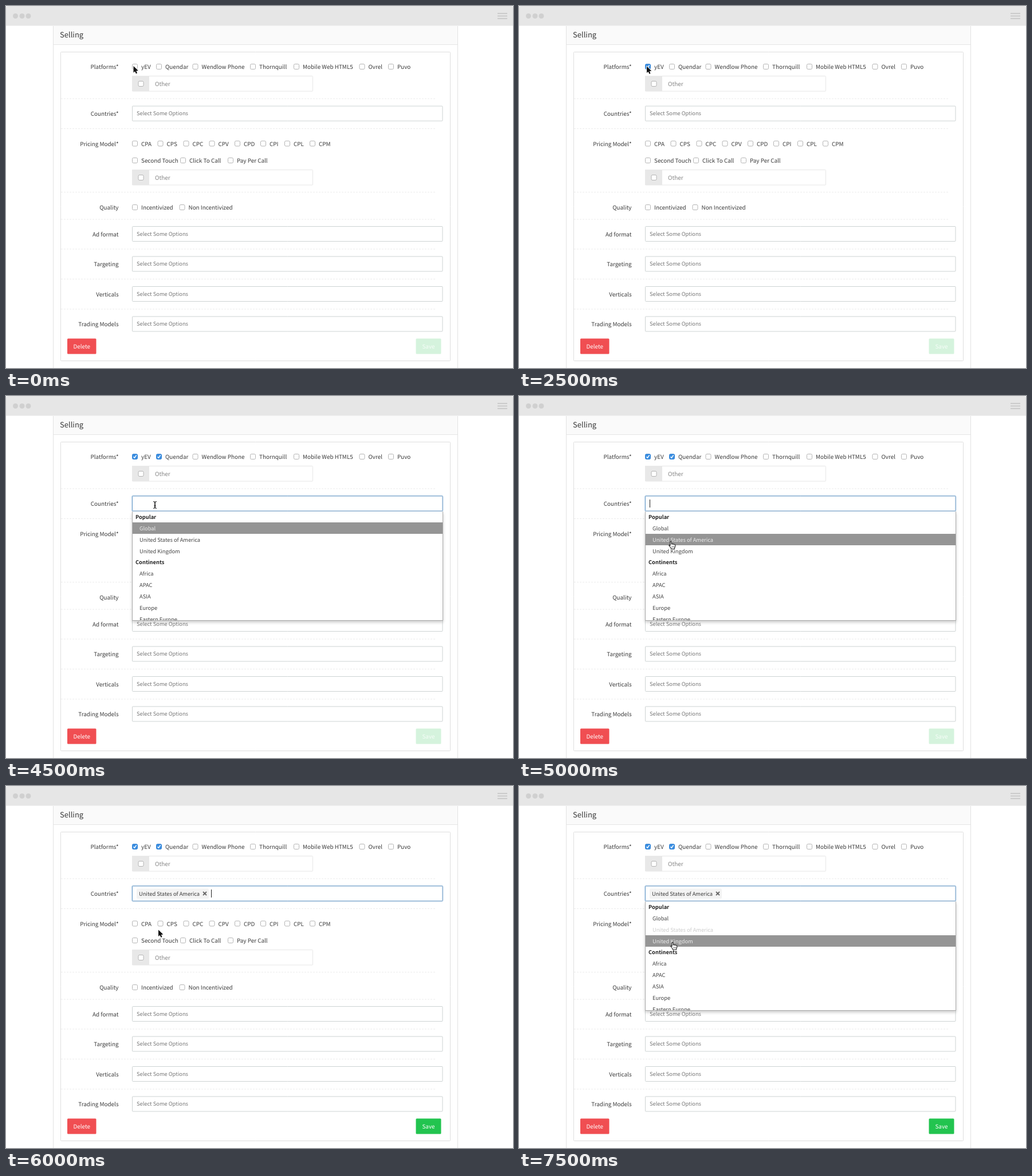
These frames come from a looping animation (885 by 633 pixels, 8000 ms). An HTML page with a canvas:

```html
<!DOCTYPE html>
<html lang="en">
<head>
<meta charset="utf-8">
<title>Selling form</title>
<style>
html, body { margin: 0; width: 100%; height: 100%; overflow: hidden; background: #fff; }
canvas { display: block; }
</style>
</head>
<body>
<canvas id="stage" width="885" height="633"></canvas>
<script>
const ctx = document.getElementById('stage').getContext('2d');
const LOOP = 8000, STEP = 500;
const FAMILY = '"Noto Sans CJK JP", "Noto Sans CJK SC", "Noto Sans CJK", "Open Sans", sans-serif';
const LABEL = 9.9, SMALL = 9.3;
const INK = '#3a3a3a', HINT = '#777';

const platforms = [[225, 'yEV'], [267, 'Quendar'], [330.5, 'Wendlow Phone'], [431, 'Thornquill'],
  [507, 'Mobile Web HTML5'], [621.5, 'Ovrel'], [672, 'Puvo']];
const pricing = [[225, 'CPA'], [269.5, 'CPS'], [314.5, 'CPC'], [359.5, 'CPV'],
  [404, 'CPD'], [449, 'CPI'], [491, 'CPL'], [535, 'CPM']];
const pricingMore = [[225, 'Second Touch'], [309, 'Click To Call'], [392, 'Pay Per Call']];
const quality = [[225, 'Incentivized'], [307.5, 'Non Incentivized']];
const labels = [['Platforms*', 106], ['Countries*', 188], ['Pricing Model*', 240.5], ['Quality', 352],
  ['Ad format', 399], ['Targeting', 451], ['Verticals', 503.5], ['Trading Models', 556]];
const options = ['Popular', 'Global', 'United States of America', 'United Kingdom', 'Continents',
  'Africa', 'APAC', 'ASIA', 'Europe', 'Eastern Europe'];

// Pointer: start time, shape, x, y
const pointer = [
  [0, arrow, 222.5, 105], [1000, arrow, 223, 105.5], [3000, arrow, 268.5, 105.5],
  [4000, beam, 260, 190.5], [5000, hand, 267, 260.5], [6000, arrow, 266, 251.5],
  [6500, beam, 410, 189], [7500, hand, 270, 279.5]
];

function text(str, x, mid, size, color, align = 'left', weight = 400) {
  ctx.font = `${weight} ${size}px ${FAMILY}`;
  ctx.textRendering = 'geometricPrecision';
  ctx.textAlign = align;
  ctx.fillStyle = color;
  ctx.fillText(str, x, mid + size * 0.37);
}

function rect(x, y, w, h, fill) {
  ctx.fillStyle = fill;
  ctx.fillRect(x, y, w, h);
}

function box(x, y, w, h, r, fill, stroke) {
  ctx.beginPath();
  ctx.roundRect(x, y, w, h, r);
  if (fill) { ctx.fillStyle = fill; ctx.fill(); }
  if (stroke) { ctx.strokeStyle = stroke; ctx.lineWidth = 1; ctx.stroke(); }
}

function path(points, color, width, close) {
  ctx.beginPath();
  points.forEach(([x, y]) => ctx.lineTo(x, y));
  if (close) ctx.closePath();
  ctx.strokeStyle = color;
  ctx.lineWidth = width;
  ctx.stroke();
}

function checkbox(x, y, on) {
  box(x - 4.5, y - 4.5, 9, 9, 2, on ? '#3b8fe2' : '#fff', on ? '#3583d3' : '#b4b4b4');
  if (on) path([[x - 2.4, y + 0.2], [x - 0.7, y + 2.3], [x + 2.6, y - 2.6]], '#fff', 1.5);
}

function checks(list, y, checked = []) {
  list.forEach(([x, name], i) => {
    checkbox(x, y, checked[i]);
    text(name, x + 11, y + 0.5, LABEL, INK);
  });
}

function other(y) {
  box(220.5, y - 13.5, 315, 26.5, 1, '#fff', '#e6e6e6');
  rect(220, y - 14, 30, 27, '#e8e8e8');
  checkbox(235.5, y, false);
  text('Other', 260, y, 10, '#858585');
}

function field(y, hint) {
  box(220.5, y - 13, 541.5, 26, 1, '#fff', '#cdd3d3');
  if (hint) text('Select Some Options', 228, y - 0.3, SMALL, HINT);
}

function button(x, w, name, fill, color) {
  box(x, 581.5, w, 27, 1.5, fill);
  text(name, x + w / 2, 595.3, LABEL, color, 'center');
}

function chrome() {
  rect(0, 0, 885, 633, '#fff');
  box(0, 0, 885, 34.5, [4, 4, 0, 0], '#e6e6e6');
  for (const x of [16.5, 28, 39]) {
    ctx.beginPath();
    ctx.arc(x, 17.5, 4.5, 0, 7);
    ctx.fillStyle = '#d0d0d0';
    ctx.fill();
  }
  for (const y of [12, 16.5, 21]) rect(858, y, 17, 2, '#cbcbcb');
  rect(83, 35, 705, 32, '#fafafa');
  rect(82, 67, 707, 1, '#e6e6e6');
  rect(82, 35, 1, 598, '#e2e2e2');
  rect(788, 35, 1, 598, '#e2e2e2');
  text('Selling', 94, 50.5, 13, INK);
  box(95.5, 80.5, 680, 540, 1, null, '#dedede');
  ctx.setLineDash([3, 2]);
  for (const y of [162, 214.5, 325.5, 373, 425, 477.5, 530]) {
    path([[96, y], [751, y]], '#ececec', 1);
  }
  ctx.setLineDash([]);
}

function form(t) {
  labels.forEach(([name, y]) => text(name, 196.5, y + 0.5, LABEL, INK, 'right'));
  checks(platforms, 106, [t >= 1500, t >= 3500]);
  other(136);
  checks(pricing, 240.5);
  checks(pricingMore, 270);
  other(300);
  checks(quality, 352);
  field(188, t < 4500);
  for (const y of [398.5, 451, 503.5, 556]) field(y, true);
  button(107, 50.5, 'Delete', '#f04e52', '#fff');
  const ready = t >= 6000;
  button(715.5, 44, 'Save', ready ? '#22c44f' : '#d5f3dd', ready ? '#fff' : '#f6fdf8');
}

function countries(t) {
  if (t < 4500) return;
  const tagged = t >= 6000;
  box(219.5, 174, 543.5, 28, 2, null, 'rgba(90,150,205,.3)');
  box(220.5, 175, 541.5, 26, 1, '#fff', '#6a9cc9');
  if (tagged) {
    box(228, 179.5, 126, 17.5, 2, '#f3f3f3');
    text('United States of America', 232, 188.2, SMALL, INK);
    path([[344, 185], [350, 191]], '#686868', 1.8);
    path([[350, 185], [344, 191]], '#686868', 1.8);
  }
  if (Math.floor(t / STEP) % 2 === 0) rect(tagged ? 358 : 228, 181, 1, 14, '#222');
  if (t < 6000 || t >= 7000) {
    const active = t < 5000 ? 1 : t < 6000 ? 2 : t < 7500 ? 1 : 3;
    menu(active, tagged);
  }
}

function menu(active, tagged) {
  ctx.save();
  ctx.shadowColor = 'rgba(0,0,0,.2)';
  ctx.shadowBlur = 5;
  ctx.shadowOffsetY = 3;
  rect(220, 202, 543, 191, '#aaa');
  ctx.restore();
  rect(221, 202, 541, 190, '#fff');
  ctx.save();
  ctx.beginPath();
  ctx.rect(221, 202, 541, 190);
  ctx.clip();
  options.forEach((name, i) => {
    const y = 211.5 + i * 19.87;
    const group = i === 0 || i === 4;
    if (i === active) rect(221, Math.round(y - 10), 541, 20, '#959595');
    const color = i === active ? '#ededed' : tagged && i === 2 ? '#ccc' : group ? '#222' : '#444';
    text(name, group ? 226 : 233, y, SMALL, color, 'left', group ? 700 : 400);
  });
  ctx.restore();
}

function arrow() {
  ctx.beginPath();
  for (const p of [[0, 0], [0, 11.5], [2.6, 9.2], [4.4, 13.3], [6.5, 12.4], [4.8, 8.4], [8.3, 8.1]]) {
    ctx.lineTo(...p);
  }
  ctx.closePath();
  ctx.strokeStyle = '#fff';
  ctx.lineWidth = 1.6;
  ctx.stroke();
  ctx.fillStyle = '#111';
  ctx.fill();
}

function beam() {
  for (const [color, width] of [['#fff', 2.6], ['#222', 1.2]]) {
    path([[-3, -6], [-1, -5.5], [0, -4.5], [0, 4.5], [-1, 5.5], [-3, 6]], color, width);
    path([[3, -6], [1, -5.5], [0, -4.5], [0, 4.5], [1, 5.5], [3, 6]], color, width);
    path([[-1.7, 1.5], [1.7, 1.5]], color, width);
  }
}

function hand() {
  const outline = new Path2D('M-3 1V-5.2Q-1.9-7-.8-5.2V-1.4Q.5-2.6 1.6-1.2Q3-2.2 4-.7Q5.8-1 5.9 .8' +
    'Q6 3.4 4.6 5V6.8H-1.6V5.4Q-3.4 3.4-5.2 1Q-5.2-.8-3 1Z');
  ctx.fillStyle = '#fff';
  ctx.fill(outline);
  ctx.strokeStyle = '#222';
  ctx.lineWidth = 1.1;
  ctx.stroke(outline);
  for (const x of [0, 1.8, 3.6]) path([[x, 1.8], [x, 4.4]], '#444', 0.7);
}

function draw(now) {
  const t = now % LOOP;
  ctx.lineJoin = 'round';
  chrome();
  form(t);
  countries(t);
  const [, shape, x, y] = pointer.findLast(p => p[0] <= t);
  ctx.save();
  ctx.translate(x, y);
  shape();
  ctx.restore();
}

const start = performance.now();
function tick() {
  draw(performance.now() - start);
  requestAnimationFrame(tick);
}
tick();
</script>
</body>
</html>
```
